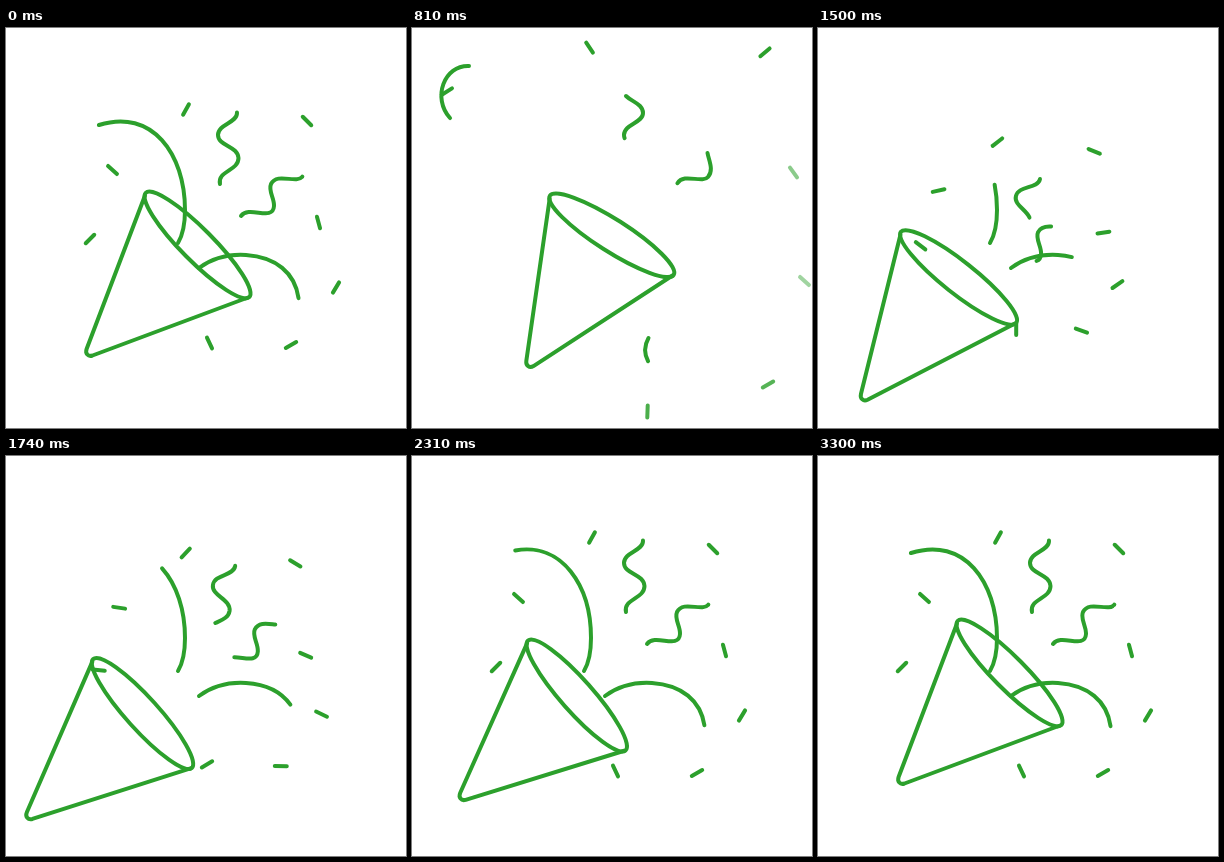
Write an HTML page that moves like this. It is 400 px wide and 400 px high and loops after 3330 ms.

```html
<!DOCTYPE html>
<html lang="en">
<head>
<meta charset="utf-8">
<title>Party popper</title>
<style>
  html, body { margin: 0; width: 100%; height: 100%; overflow: hidden; background: #fff; }
  svg { display: block; width: 100vw; height: 100vh; }
</style>
</head>
<body>
<svg viewBox="0 0 400 400" fill="none" stroke="#2ca02c" stroke-width="4" stroke-linecap="round" stroke-linejoin="round">
  <g id="cone">
    <path d="M139 167.500L80.600 321C79 325.500 82 329 86.500 327.500L242 269.500"/>
    <ellipse cx="191.500" cy="217" rx="73.500" ry="16" transform="rotate(45.200 191.500 217)"/>
  </g>
</svg>
<script>
const LOOP = 3330, POP = 1140, REST = 3300;
const burst = { x: 177, y: 245, pull: 0.43 };
const svg = document.querySelector('svg');
const cone = document.getElementById('cone');

// Easing over the time span a to b.
const clamp = v => Math.max(0, Math.min(1, v));
const span = (t, a, b) => clamp((t - a) / (b - a));
const smooth = u => u * u * (3 - 2 * u);
const glide = (t, a, b) => smooth(span(t, a, b) ** 0.67);
const left = (t, a, b, power) => (1 - span(t, a, b)) ** power;
const mix = (a, b, u) => a + (b - a) * u;

function add(name, attrs) {
  const el = document.createElementNS('http://www.w3.org/2000/svg', name);
  for (const key in attrs) el.setAttribute(key, attrs[key]);
  return svg.appendChild(el);
}

// x, y, angle, flight dx, flight dy, turn going out, turn coming in, arrival time
const dashes = [
  [180, 81.5, -61, -2.5, -63, -64, 38, 920],
  [301, 93, 45, 53, -70, 97, -38, 920],
  [106.5, 142, 42, -73, -80, 108, -90, 920],
  [84, 211, -45, -73, 20, -90, 136, 500],
  [312.5, 194.5, 75, 69, -50, 159, -138, 720],
  [330, 259.5, -59, 62.5, -6.5, 101, -256, 700],
  [285, 317, -30, 71, 39.5, 0, 82, 770],
  [203.5, 315, 65, 32, 68.5, 27, -255, 780]
].map(([x, y, angle, dx, dy, turnOut, turnIn, arrive]) => ({
  x, y, angle, dx, dy, turnOut, turnIn, arrive,
  el: add('line', { x1: -6, x2: 6, y1: 0, y2: 0 })
}));

// Each ribbon rests on one curve and leaves along a tail.
const ribbons = [
  {
    rest: 'M172 215C178 205 179 193 179 182C179 126 146 80 93 97',
    tail: 'C75 102 56 111 38 90C20 70 32 37 57 38',
    gone: 1110, power: 1, grow: 3.1
  },
  {
    rest: 'M193 240C208 229 224 226 240 227C270 229 289 245 292.500 270',
    tail: 'C296 305 262 372 236.500 334C232 326 232 318 236.500 310',
    gone: 890, power: 1, grow: 5.5
  },
  {
    rest: 'M214 156C211 143 232.500 143 232.500 130C232 118 212 118 212 107C212 96 231 95 231 85',
    tail: 'C231 76 220 74 214 68',
    gone: 1073, power: 4, curl: { dx: -36, dy: 156, turn: 24, hide: 1.05, clip: 0 }
  },
  {
    rest: 'M235 188C243 177 267 194 268 178C268.500 170 262 163 265 156C271 144 290 156 296 149',
    tail: 'C302 142 297 133 295.500 125',
    gone: 1073, power: 4, curl: { dx: -115, dy: 123, turn: 0, hide: 0.8, clip: 0.33 }
  }
];
for (const r of ribbons) {
  r.el = add('path', { d: r.rest });
  r.base = r.el.getTotalLength();
  r.el.setAttribute('d', r.rest + r.tail);
  r.extra = r.el.getTotalLength() - r.base;
}

const spinIn = t => left(t, POP, 2270, 1.3);
const curlIn = t => left(t, POP, 2100, 2);

// Lean into the shot, recoil, then drift back.
function drawCone(t) {
  const wind = smooth(span(t, 0, 900));
  const kick = power => 1 - left(t, POP, 1740, power);
  const axis = (ready, kicked, hit, settle) =>
    mix(ready * wind, kicked * (1 - glide(t, settle, REST)), hit);
  const x = axis(8.5, -55, kick(3), 1740);
  const y = axis(-10, 40.5, kick(2), 1850);
  const turn = axis(-13, 5.5, smooth(span(t, 1250, 1900)), 1900);
  cone.setAttribute('transform', `translate(${x} ${y}) rotate(${turn} 191.5 217)`);
}

function drawDash(d, t) {
  let { x, y, angle } = d, alpha;
  if (t < POP) {
    const go = glide(t, 0, d.arrive);
    x += d.dx * go;
    y += d.dy * go;
    angle += d.turnOut * go;
    alpha = 1 - span(t, d.arrive, d.arrive + 200);
  } else {
    const back = burst.pull * left(t, POP, 2270, 2);
    x = mix(x, burst.x, back);
    y = mix(y, burst.y, back);
    angle += d.turnIn * spinIn(t);
    alpha = span(t, POP, POP + 90);
  }
  d.el.setAttribute('transform', `translate(${x} ${y}) rotate(${angle})`);
  d.el.setAttribute('opacity', alpha);
}

// Start and end of the visible part: 0 to 1 on the curve, 1 to 2 on the tail.
function trim(r, t) {
  if (t < POP) return [2 * span(t, 0, r.gone) ** r.power, 1 + span(t, 0, 680)];
  if (r.curl) return [r.curl.hide * curlIn(t), 1 - r.curl.clip * spinIn(t)];
  return [0, 1 - left(t, 1290, 3000, r.grow)];
}

function drawRibbon(r, t) {
  const [start, end] = trim(r, t).map(u => Math.min(u, 1) * r.base + Math.max(u - 1, 0) * r.extra);
  const size = end - start;
  r.el.setAttribute('visibility', size > 0.3 ? 'visible' : 'hidden');
  r.el.setAttribute('stroke-dasharray', `${Math.max(size, 0.1)} 2000`);
  r.el.setAttribute('stroke-dashoffset', -start);
  if (!r.curl) return;
  const { dx, dy, turn } = r.curl;
  const move = t < POP ? 0 : curlIn(t);
  const spin = t < POP ? 0 : spinIn(t);
  r.el.setAttribute('transform',
    `translate(${dx * move} ${dy * move}) rotate(${turn * spin} 212 107)`);
}

function draw(t) {
  drawCone(t);
  for (const d of dashes) drawDash(d, t);
  for (const r of ribbons) drawRibbon(r, t);
}

let begin;
function tick(now) {
  begin ??= now;
  draw((now - begin) % LOOP);
  requestAnimationFrame(tick);
}
draw(0);
requestAnimationFrame(tick);
</script>
</body>
</html>
```
